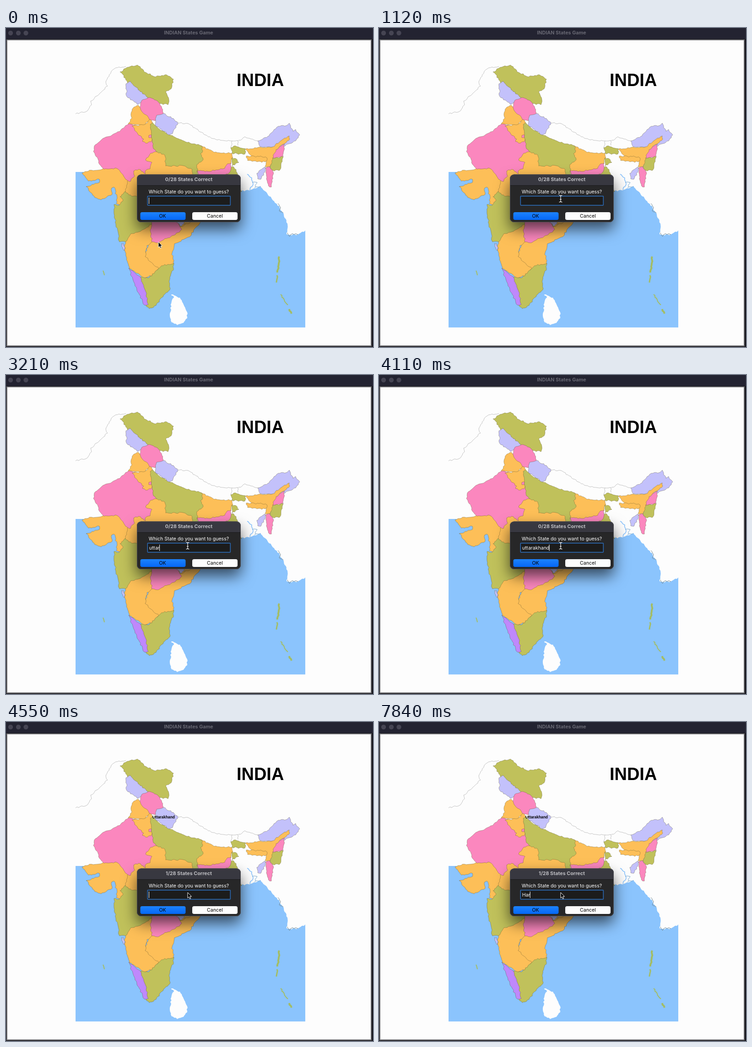
An HTML page for the animation above (8 s loop, 802 by 698 pixels).

```html
<!DOCTYPE html>
<html lang="en">
<head>
<meta charset="utf-8">
<title>INDIAN States Game</title>
<style>
html, body { margin: 0; width: 100%; height: 100%; overflow: hidden; background: #15151c; }
svg { display: block; width: 802px; height: 698px; }
text { font-family: Inter, "Open Sans", sans-serif; font-size: 10.55px; white-space: pre; }
.mid { text-anchor: middle; }
.bold { font-weight: 700; font-size: 10.75px; }
.map { font-family: "Liberation Sans", Arial, sans-serif; font-weight: 700; }
#states path { stroke: #57502f; stroke-opacity: .5; stroke-width: .8; stroke-linejoin: round; }
#lines path { fill: none; }
#dialog { filter: drop-shadow(0 15px 16px rgba(0,0,0,.62)); }
</style>
</head>
<body>
<svg viewBox="0 0 802 698">
  <defs>
    <linearGradient id="blue" x1="0" y1="0" x2="0" y2="1">
      <stop stop-color="#1d83ff"/><stop offset="1" stop-color="#0567f5"/>
    </linearGradient>
  </defs>
  <rect width="802" height="698" fill="#17171d"/>
  <rect id="bar" width="802" height="24"/>
  <rect x="2" y="26" width="796" height="669.5" fill="#fdfdfd" stroke="#77777a" stroke-width="2"/>
  <g id="lights"><circle cx="10" cy="11" r="5.2"/><circle cx="27" cy="11" r="5.2"/><circle cx="43.5" cy="11" r="5.2"/></g>
  <text id="title" class="mid bold" x="399" y="14.3">INDIAN States Game</text>

  <g id="water"></g>
  <g id="states"></g>
  <g id="lines"></g>
  <text class="map" x="503.9" y="127.3" style="font-size:38px">INDIA</text>
  <text id="label" class="map mid" x="344.5" y="210.5" style="font-size:8.4px">Uttarakhand</text>

  <g id="dialog">
    <rect x="286" y="320.5" width="227" height="104.5" rx="9" fill="#272728"/>
    <path d="M286 344V329.5a9 9 0 0 1 9-9H504a9 9 0 0 1 9 9V344z" fill="#383840"/>
    <path d="M286 344.5H513" stroke="#1a1a1c"/>
    <rect x="286.5" y="321" width="226" height="103.5" rx="8.5" fill="none" stroke="#4d4d52"/>
    <text id="score" class="mid bold" x="399.5" y="335.3" fill="#bcbcc0"></text>
    <text class="mid" x="399.5" y="361.7" fill="#fff">Which State do you want to guess?</text>
    <rect x="309.3" y="367.8" width="181" height="20" rx="1" fill="#1c1c1c" stroke="#2b66ac" stroke-width="1.7"/>
    <text id="guess" x="312.7" y="381.8" fill="#fff"></text>
    <rect id="caret" y="371" width="1" height="14" fill="#fff"/>
    <rect x="293.5" y="403" width="99" height="17" rx="4" fill="url(#blue)"/>
    <rect x="407" y="403" width="99" height="17" rx="4" fill="#fdfdfd"/>
    <text class="mid" x="342" y="415.3">OK</text>
    <text class="mid" x="456.4" y="415.3">Cancel</text>
  </g>
  <path id="arrow" d="M0 0V12.2L2.7 9.7 4.7 14 6.7 13.1 4.8 8.9H8.5z" fill="#000" stroke="#fff"/>
  <path id="beam" d="M-3.5-7Q-.5-7 0-5 .5-7 3.5-7M0-5.5V6.5M-3.5 8Q-.5 8 0 6 .5 8 3.5 8M-2 2H2" fill="none" stroke="#fff" stroke-width="1.1"/>
</svg>
<script>
const $ = id => document.getElementById(id);
const white = '#fdfdfd', blue = '#8bc4fd';
const olive = '#c0c15b', orange = '#fdbf58', pink = '#fb87be', lilac = '#c3c1fb', purple = '#bf88fc';

let seed = 7;
const random = () => (seed = seed * 16807 % 2147483647) / 2147483647;

// Joins a few corner points by jagged edges.
function rough(corners, closed) {
  const points = corners.split(' ').map(p => p.split(',').map(Number));
  if (closed) points.push(points[0]);
  const out = [];
  points.forEach(([x, y], k) => {
    out.push([x, y]);
    if (k + 1 === points.length) return;
    const dx = points[k + 1][0] - x, dy = points[k + 1][1] - y, len = Math.hypot(dx, dy);
    for (let d = 3.5; d < len - 2; d += 3.5) {
      const side = (random() - .5) * 3 / len;
      out.push([x + dx * d / len - dy * side, y + dy * d / len + dx * side]);
    }
  });
  return 'M' + out.map(p => p.map(v => v.toFixed(1)).join(' ')).join('L');
}
function add(parent, d, attrs) {
  const path = document.createElementNS('http://www.w3.org/2000/svg', 'path');
  for (const key in attrs) path.setAttribute(key, attrs[key]);
  path.setAttribute('d', d);
  $(parent).append(path);
}
const area = (fill, corners, parent = 'states') => add(parent, rough(corners, true) + 'z', { fill });
const line = (stroke, width, corners) => add('lines', rough(corners, false), { stroke, 'stroke-width': width });

add('water', rough('514,357 535,354 556,346 566,357 581,374 592,385 606,405 615,428 614,452 635,453 654,443')
  + 'V655.3H152V315H168L300 340 490 345z', { fill: blue });
area(white, '361,583 380,590 396,622 396,635 388,645 374,650 362,644 358,630 362,598 367,590', 'water');

// Painted from back to front: each border belongs to the state on top, hidden sides stay coarse.
area(orange, '166,317 187,311 242,306 275,325 270,365 252,386 241,384 243,372 236,348 231,350 232,364 208,376 194,371 175,347 204,338 204,331 180,335'); // Gujarat
area(olive, '256,363 249,369 256,376 247,388 236,386 238,418 248,468 261,468 340,460 385,435 385,350 275,345'); // Maharashtra
area(orange, '265,335 261,357 268,365 292,371 328,366 341,369 371,366 410,330 408,300 335,262 300,280'); // Madhya Pradesh
area(pink, '268,209 300,220 320,243 330,271 316,274 305,289 319,294 315,308 304,313 305,319 290,309 279,313 281,324 270,336 259,327 250,315 242,307 214,309 204,298 201,287 191,270 193,258 209,244 249,226'); // Rajasthan
area(orange, '425,257 455,272 494,274 496,283 492,292 485,325 420,325 410,290'); // Bihar
area(olive, '318,206 331,218 357,234 386,246 427,258 430,269 425,275 431,288 417,299 419,321 410,323 407,310 386,301 349,302 347,278 330,271 322,264 313,210'); // Uttar Pradesh
area(olive, '494,303 503,310 508,330 515,358 482,363 460,350 465,325'); // West Bengal
area(olive, '493,284 503,286 509,294 494,302');
area(olive, '491,262 498,258 523,264 522,276 494,274');
area(orange, '315,465 384,434 415,412 436,412 414,437 401,457 368,472 363,492 367,515 340,535 300,510'); // Andhra Pradesh
area(orange, '420,345 477,352 482,363 480,385 456,398 433,415 415,412 404,424 383,434 375,400'); // Odisha
area(pink, '418,312 438,313 456,312 478,307 484,297 492,296 490,314 465,333 478,349 470,352 440,352 425,355'); // Jharkhand
area(lilac, '410,323 426,322 434,340 430,350 411,363 401,382 405,390 394,395 400,400 398,413 383,434 367,421 373,394 369,388 371,366 377,346 394,342 397,328'); // Chhattisgarh
area(orange, '261,468 273,450 287,447 308,436 320,428 319,468 308,476 304,500 318,513 334,526 321,541 303,547 270,527 259,485'); // Karnataka
area(pink, '332,398 362,405 361,412 376,427 384,441 370,452 345,463 330,470 319,468 315,442 322,414 321,408'); // Telangana
area(olive, '367,515 366,526 358,545 358,573 340,590 328,607 313,614 305,605 293,545 313,546 334,526 340,520'); // Tamil Nadu
area(purple, '268,525 283,537 293,544 299,560 306,578 311,605 302,606 290,580 277,549'); // Kerala
area(lilac, '252,472 257,472 260,480 258,487'); // Goa
area(olive, '249,96 265,86 287,81 305,97 327,107 348,102 366,112 361,133 349,140 356,157 354,168 335,165 310,157 270,125 261,110'); // Ladakh
area(lilac, '272,117 262,122 264,150 289,167 306,160 310,152 292,137'); // Kashmir
area(pink, '297,158 312,152 328,158 340,172 344,188 326,203 300,200 292,173'); // Himachal Pradesh
area(orange, '289,169 298,184 306,190 314,202 300,214 267,210 275,197 273,188 277,176'); // Punjab
area(orange, '275,214 300,212 316,200 320,206 315,211 319,246 309,252 298,248 301,243 288,232'); // Haryana
area(pink, '312,235 318,234 318,240 312,240'); // Delhi
area(lilac, '329,191 344,187 366,198 376,208 364,231 357,234 326,212'); // Uttarakhand
area(lilac, '550,247 575,236 586,222 595,215 614,213 619,208 627,226 633,222 642,234 633,247 620,253 600,262 556,260'); // Arunachal Pradesh
area(orange, '523,265 558,261 583,260 600,247 619,236 620,243 596,262 588,285 577,304 566,303 568,289 540,285'); // Assam
area(orange, '525,280 567,282 571,287 566,293 528,290'); // Meghalaya
area(pink, '604,256 609,254 606,281 582,285 590,266'); // Nagaland
area(olive, '584,284 606,282 601,303 597,312 579,311 577,304'); // Manipur
area(pink, '567,306 577,304 584,315 580,348 576,348 569,330'); // Mizoram
area(lilac, '566,304 567,312 557,331 550,330 548,318'); // Tripura

const grey = '#bcbcbc', islet = '#a3bd66';
line(grey, .9, '152,188 175,183 187,168 185,160 200,148 222,127 218,118 230,95 240,87 262,84');
line(grey, .9, '376,208 398,209 436,234 462,245 494,247 491,262');
line(grey, .9, '494,247 506,246 507,257');
line(grey, .9, '506,248 522,238 550,247');
line(blue, 1.6, '527,320 537,328 540,340 533,354');
line('#7aa9cf', 1, '538,338 549,338 543,350 556,346');
line('#718996', 1, '594,384 600,392 597,400 606,405');
line('#718996', 1, '615,448 620,456 626,450 638,452');
line(islet, 4, '597,500 596,515 593,535');
line(islet, 3, '592,541 591,557');
line(islet, 2, '600,583 616,606');
line(islet, 4, '619,615 624,625');
line(islet, 2, '212,531 215,541');

// Each burst of keys: when it starts, the time between keys, and the keys.
const bursts = [[1760, 110, 'utt'], [2470, 220, 'ar'], [3420, 140, 'ak'], [3820, 90, 'hand'], [7170, 0, 'H'], [7430, 100, 'ar']];
const submitted = 4350, labelled = 4420, reopened = 4480;
const lightColors = ['#ff5f57', '#f7b32b', '#28c33f'];

const show = (id, on) => $(id).setAttribute('visibility', on ? 'visible' : 'hidden');
const ease = (t, from, to) => {
  const u = Math.min(1, Math.max(0, (t - from) / (to - from)));
  return u * u * (3 - 2 * u);
};
const typed = t => bursts
  .filter(([start]) => t >= start && start > submitted === t >= submitted)
  .map(([start, gap, keys]) => keys.slice(0, gap ? 1 + Math.floor((t - start) / gap) : 1))
  .join('');

function draw(t) {
  const second = t >= submitted, active = second && t < reopened;
  const toButton = ease(t, 100, 470), toField = ease(t, 580, 1120);
  const x = 333 + 42 * toButton + 22 * toField, y = 468 - 56 * toButton - 39 * toField;
  const beam = y < 388 && !second;

  $('bar').setAttribute('fill', active ? '#33323b' : '#232331');
  $('title').setAttribute('fill', active ? '#b6b6ba' : '#686873');
  [...$('lights').children].forEach((c, i) => c.setAttribute('fill', active ? lightColors[i] : '#464553'));

  show('label', t >= labelled);
  $('dialog').style.display = active ? 'none' : '';
  $('score').textContent = (second ? 1 : 0) + '/28 States Correct';
  $('guess').textContent = typed(t);
  if (!active) $('caret').setAttribute('x', 312 + $('guess').getComputedTextLength());
  show('caret', (t + 900 - (second ? 540 : 480)) % 900 < 600);

  show('arrow', !beam);
  show('beam', beam);
  for (const id of ['arrow', 'beam']) $(id).setAttribute('transform', `translate(${x} ${y})`);
}

const start = performance.now();
function tick() {
  draw((performance.now() - start) % 8000);
  requestAnimationFrame(tick);
}
tick();
</script>
</body>
</html>
```
